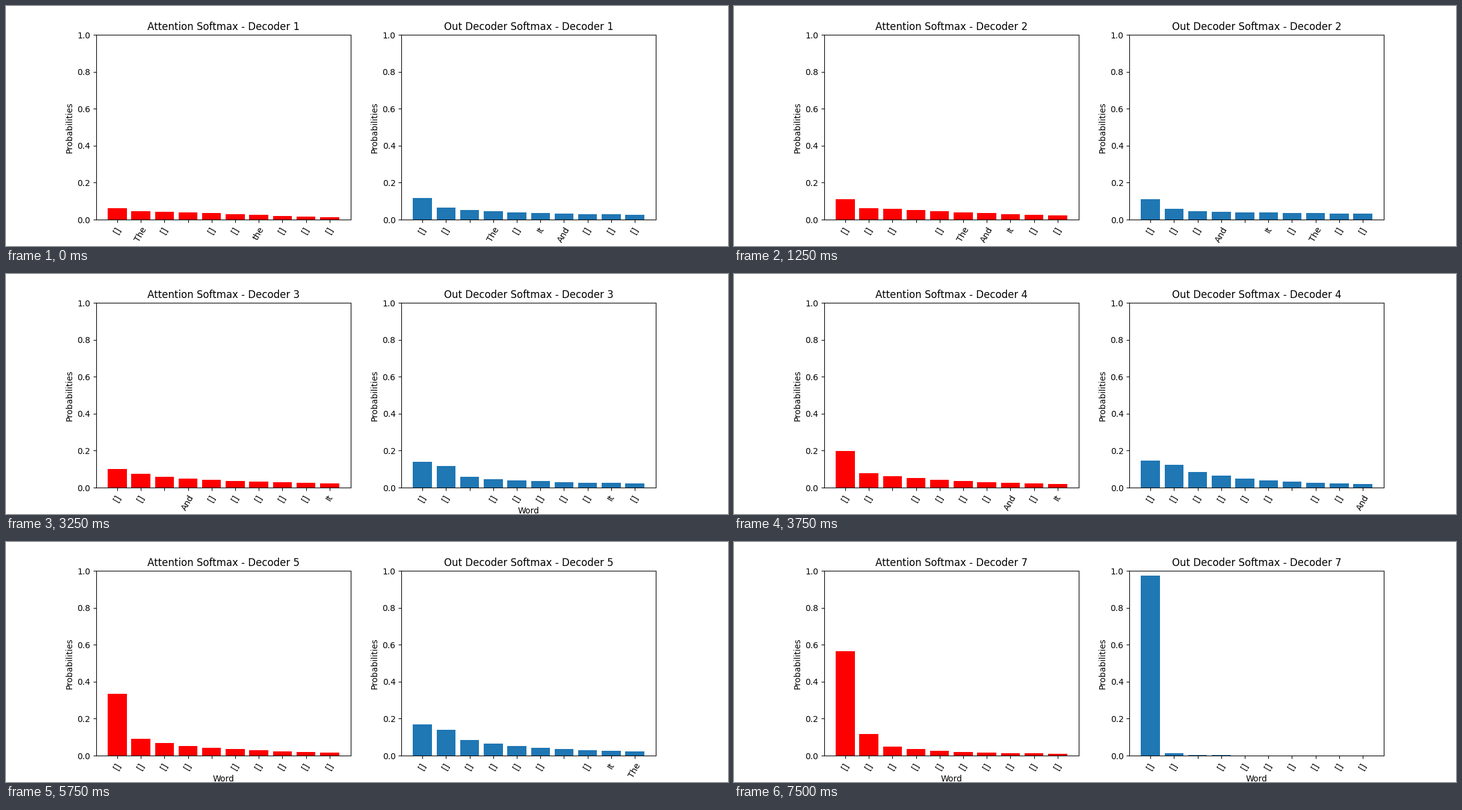
Recreate the animation shown at these times as a matplotlib script. Size 1200 by 400 pixels, loop 8000 ms.

```python
import matplotlib.pyplot as plt
import numpy as np
from matplotlib.animation import FuncAnimation

INTERVAL = 250          # ms per frame
HOLD = 5                # frames each decoder stays on screen
FRAMES = 32
BARS = 10


def falloff(top, second, last, bend):
    """Top bar, then a log-scale slide from second to last; a small bend drops early."""
    u = np.linspace(0, 1, BARS - 1)
    return np.append(top, second * (last / second) ** u ** bend)


# One entry per decoder: words ("_" is a blank word) and shape of the fall-off.
ATTENTION = [
    ("[] The [] _ [] [] the [] [] []", falloff(.062, .046, .013, 1.5)),
    ("[] [] [] _ [] The And It [] []", falloff(.110, .062, .023, 1.2)),
    ("[] [] _ And [] [] [] [] [] It", falloff(.100, .075, .023, .75)),
    ("[] [] _ [] [] [] [] And [] It", falloff(.198, .078, .019, .85)),
    ("[] [] [] [] _ [] [] [] [] []", falloff(.334, .091, .016, .85)),
    ("[] [] [] [] [] [] It _ [] []", falloff(.360, .088, .016, .9)),
    ("[] [] [] [] [] [] [] [] [] []", falloff(.565, .117, .010, .5)),
]
OUTPUT = [
    ("[] [] _ The [] It And [] [] []", falloff(.117, .065, .026, .65)),
    ("[] [] [] And _ It [] The [] []", falloff(.110, .058, .032, .45)),
    ("[] [] _ [] [] [] [] [] It []", falloff(.140, .117, .023, .4)),
    ("[] [] [] [] [] [] _ [] [] And", falloff(.146, .123, .019, .75)),
    ("[] [] [] [] [] [] _ [] It The", falloff(.169, .140, .023, .6)),
    ("[] [] [] [] [] [] [] [] It []", falloff(.195, .162, .023, .45)),
    ("[] [] _ [] [] [] [] [] [] []", falloff(.974, .013, .0003, .5)),
]

plt.rcParams["font.family"] = "DejaVu Sans"
fig, (left, right) = plt.subplots(1, 2, figsize=(12, 4), dpi=100)


def draw_bars(ax, name, color, step, data):
    words, probs = data[step]
    labels = [w.replace("_", "") for w in words.split()]
    ax.clear()
    ax.bar(range(BARS), probs, color=color)
    ax.set_xticks(range(BARS), labels, rotation=60)
    ax.set_ylim(0, 1)
    ax.set_xlabel("Word")
    ax.set_ylabel("Probabilities")
    ax.set_title(f"{name} - Decoder {step + 1}")


def update(i):
    step = i // HOLD
    draw_bars(left, "Attention Softmax", "red", step, ATTENTION)
    draw_bars(right, "Out Decoder Softmax", "tab:blue", step, OUTPUT)
    return []


anim = FuncAnimation(fig, update, frames=FRAMES, init_func=lambda: update(0),
                     interval=INTERVAL, repeat=True, repeat_delay=0, blit=False)
plt.show()
```
